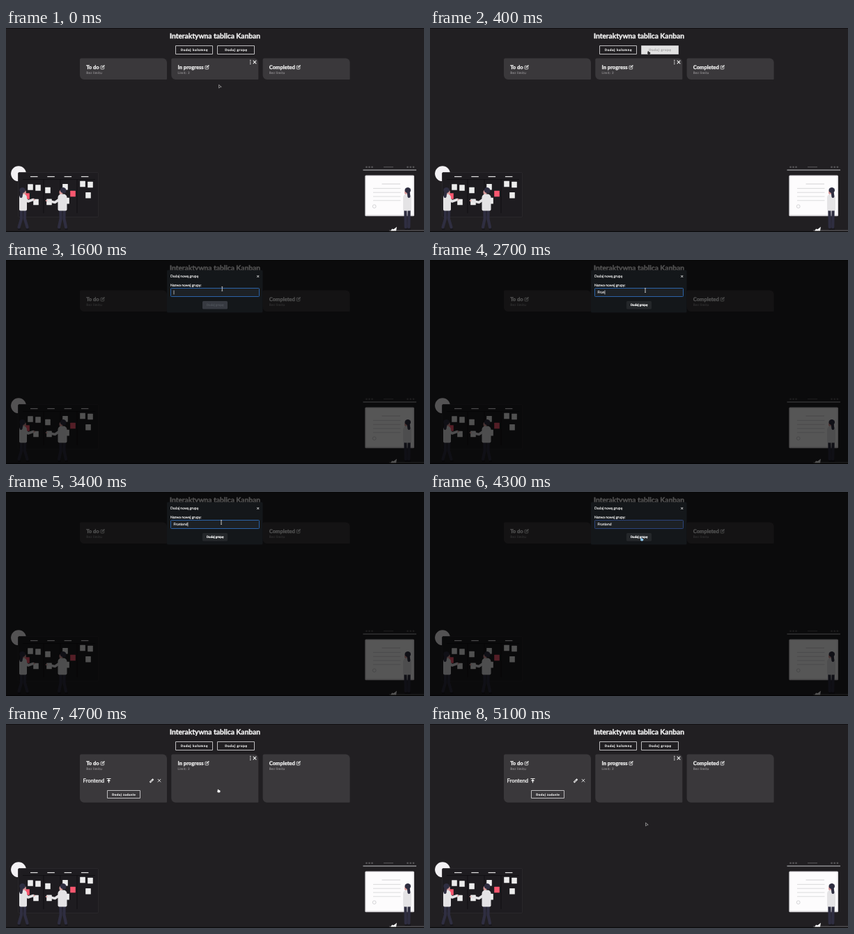
Animation of 600x293 px, one loop 5.7 s. Source, as an HTML page with a canvas:

```html
<!DOCTYPE html>
<html lang="pl">
<head>
<meta charset="utf-8">
<title>Interaktywna tablica Kanban</title>
<style>
html, body { margin: 0; width: 100%; height: 100%; overflow: hidden; background: #211f22; }
canvas { display: block; width: 600px; height: 293px; }
</style>
</head>
<body>
<canvas id="stage" width="600" height="293"></canvas>
<script>
const W = 600, H = 293, LOOP = 5700, STEP = 100;
const OPEN = 500, FOCUS = 1600, CLOSE = 4400;
const INK = '#2f2e41', SHIRT = '#e4e3e5', PINK = '#f8576f', SKIN = '#d99a9a';

const stage = document.getElementById('stage').getContext('2d');
const layer = document.createElement('canvas');
layer.width = W;
layer.height = H;
const page = layer.getContext('2d');
let c = page;

// Each move eases the pointer to a new place.
const moves = [
  { from: 0, to: 350, x: 314, y: 35.5 },
  { from: 1200, to: 1800, x: 309, y: 43.5 },
  { from: 3600, to: 4200, x: 304, y: 68 },
  { from: 4300, to: 4400, x: 301.5, y: 65 },
  { from: 4400, to: 5100, x: 311, y: 144 }
];
const WORD = 'Frontend';
const keyTimes = [2000, 2400, 2500, 2700, 3100, 3200, 3300, 3400];

function ease(t, from, to) {
  const k = Math.min(1, Math.max(0, (t - from) / (to - from)));
  return k * k * (3 - 2 * k);
}

function pointerAt(t) {
  let x = 307, y = 83.8;
  for (const m of moves) {
    const k = ease(t, m.from, m.to);
    x += (m.x - x) * k;
    y += (m.y - y) * k;
  }
  return [x, y];
}

function typedAt(t) {
  return WORD.slice(0, keyTimes.filter(at => at <= t).length);
}

function box(x, y, w, h, fill, r = 0) {
  c.fillStyle = fill;
  c.beginPath();
  c.roundRect(x, y, w, h, r);
  c.fill();
}

function frame(x, y, w, h, color, r = 0, width = 1) {
  c.strokeStyle = color;
  c.lineWidth = width;
  c.beginPath();
  c.roundRect(x, y, w, h, r);
  c.stroke();
}

function trace(p) {
  c.beginPath();
  for (let i = 0; i < p.length; i += 2) c.lineTo(p[i], p[i + 1]);
}

function line(color, width, ...p) {
  c.strokeStyle = color;
  c.lineWidth = width;
  trace(p);
  c.stroke();
}

function limb(color, width, ...p) {
  c.lineCap = c.lineJoin = 'round';
  line(color, width, ...p);
  c.lineCap = 'butt';
  c.lineJoin = 'miter';
}

function shape(fill, ...p) {
  c.fillStyle = fill;
  trace(p);
  c.fill();
}

function oval(x, y, rx, ry, fill) {
  c.fillStyle = fill;
  c.beginPath();
  c.ellipse(x, y, rx, ry, 0, 0, Math.PI * 2);
  c.fill();
}

// A hairline stroke thickens the small type slightly.
function text(s, x, y, size, { color = '#f0f0f0', weight = 400, gap = 0, align = 'left', heavy = 0.2 } = {}) {
  c.font = `${weight} ${size}px Lato, sans-serif`;
  c.letterSpacing = gap + 'px';
  c.textRendering = 'geometricPrecision';
  c.textAlign = align;
  c.fillStyle = c.strokeStyle = color;
  c.lineWidth = heavy;
  c.fillText(s, x, y);
  if (heavy) c.strokeText(s, x, y);
}

function cross(x, y, r, width = 1) {
  line('#eee', width, x - r, y - r, x + r, y + r);
  line('#eee', width, x + r, y - r, x - r, y + r);
}

function button(label, x, y, w, h, size, gap, hover = 0) {
  if (hover) box(x, y, w, h, `rgba(226,226,226,${hover})`);
  frame(x, y, w, h, '#bcbbbd');
  const color = hover > 0.9 ? '#a9a9a9' : '#eeeeee';
  text(label, x + w / 2 + gap / 2, y + h / 2 + size * 0.36, size, { color, gap, weight: 700, align: 'center' });
}

function editIcon(x, y) {
  frame(x + 0.5, y + 1.5, 4.7, 4.7, '#d8d8d8', 0.5, 0.9);
  line('#39383a', 2.4, x + 3, y + 3.6, x + 6.4, y + 0.2);
  line('#e8e8e8', 1.4, x + 2.3, y + 4.3, x + 6, y + 0.6);
}

function column(x, title, sub, h) {
  box(x, 43.5, 125, h, '#3a383b', [2, 6, 1, 6]);
  text(title, x + 9.2, 59, 7.6, { weight: 700, heavy: 0.3 });
  const end = x + 9.2 + c.measureText(title).width;
  editIcon(end + 1.8, 52.8);
  text(sub, x + 9.2, 65.5, 4.6, { color: '#858386', gap: 0.3 });
}

function group() {
  text(WORD, 110.5, 83.6, 7.7, { heavy: 0.3 });
  line('#eee', 1, 144.5, 78.5, 150.5, 78.5);
  line('#eee', 1.2, 147.5, 80, 147.5, 84.5);
  shape('#eee', 147.5, 79, 150, 82, 145, 82);
  line('#eee', 2.4, 206.6, 83.9, 211.4, 79.1);
  line('#3a383b', 0.8, 207.4, 83.1, 209.8, 80.7);
  cross(220, 81.2, 2.2, 0.9);
  button('Dodaj zadanie', 145.5, 95.5, 47, 11, 4.2, 0.6);
}

function note(x, y, fill = '#ececec') {
  box(x - 3.8, y - 4.3, 7.6, 8.6, fill, 0.5);
}

function boardArt() {
  oval(18, 209.2, 10.9, 10.9, '#f3f1f4');
  box(17.5, 207.5, 115, 64, '#1e1c20', 1.5);
  frame(17.5, 207.5, 115, 64, '#2c2a2e', 1.5, 0.8);
  line('#121114', 1, 24, 217.5, 128, 217.5);
  for (let i = 0; i < 4; i++) {
    const x = 35 + 25 * i, top = 228.5 + 4.5 * Math.sin(1.6 * i);
    line('#e4e4e4', 1.2, 35 + 24.3 * i, 213.5, 45.5 + 24.3 * i, 213.5);
    if (i) line('#100f12', 1, 30 + 24 * i, 217, 30 + 24 * i, 266);
    note(x, top);
    note(x + 4 + 4 * Math.cos(2.1 * i), 250 - 0.12 * i ** 4);
    if (i % 3 === 0) note(x + 11, top + 1);
  }
  note(96, 238, PINK);
  note(30, 241.5, PINK);
}

// Legs, shirt, head and hair around a centre x; reach is the hand of a raised arm.
function person(x, { width = 11, stride = 5, hair = 5, face = 0, reach }) {
  for (const side of [-1, 1]) {
    const foot = x + side * stride;
    limb(INK, 4.2, x + side * 2.6, 262, x + side * 2.4, 274, foot, 286);
    limb('#19181e', 2, foot - 0.5, 289, foot + 2, 289);
  }
  oval(x + face, 236, 2.5, 3.2, SKIN);
  box(x - width / 2, 238.5, width, 24, SHIRT, [5, 5, 2, 2]);
  if (reach) {
    const [hx, hy] = reach, elbow = (x + hx) / 2;
    limb(SHIRT, 3.6, x, 243, elbow, hy + 2.5, hx, hy);
    oval(hx + Math.sign(hx - x) * 1.5, hy, 1.3, 1.1, SKIN);
  }
  oval(x - face / 2, 233, 4.3, 4, INK);
  limb(INK, 4, x - face, 234, x - face * 1.6, 232 + hair);
}

function browserArt() {
  for (let i = 0; i < 3; i++) {
    oval(517.5 + 4 * i, 199.7, 1.4, 1.2, '#555457');
    oval(576.5 + 4.2 * i, 199.7, 1.4, 1.2, '#555457');
  }
  line('#555457', 1.1, 542, 199.7, 556, 199.7);
  line('#c6c5c7', 1.1, 512.5, 204, 589, 204);
  box(515.3, 211.5, 70.7, 58.7, '#d9d7da', 1.5);
  box(516.6, 212.7, 68, 55.7, '#fdfcfd', 0.5);
  line('#d2d2d4', 1, 539.5, 224, 566, 224);
  for (let i = 0; i < 4; i++) line('#d7d7d9', 0.9, 527, 230.4 + 5.8 * i, 566.5, 230.4 + 5.8 * i);
  frame(526.3, 253.8, 4.8, 4.8, '#d0d0d2', 2.4, 0.9);
  line('#807e81', 0.9, 550, 291, 600, 291);
  shape('#f2f2f2', 552, 291.5, 554, 288.5, 556.5, 289, 561, 285.5, 560, 291.5);
}

function drawPage(t) {
  const done = t >= CLOSE;
  const h = done ? 69.3 : 30.5;
  box(0, 0, W, H, '#211f22');
  text('Interaktywna tablica Kanban', 300, 14.7, 10.2, { weight: 700, align: 'center', heavy: 0.4 });
  button('Dodaj kolumnę', 243.5, 25.5, 53, 12, 4.5, 0.7);
  button('Dodaj grupę', 303.5, 25.5, 53, 12, 4.5, 0.7, done ? 0 : ease(t, 200, 400));
  column(106, 'To do', 'Bez limitu', h);
  column(237.3, 'In progress', 'Limit: 2', h);
  column(368.6, 'Completed', 'Bez limitu', h);
  for (let i = 0; i < 3; i++) oval(350.8, 46.5 + 2.5 * i, 0.8, 0.8, '#eee');
  cross(357, 49, 2.3, 1.1);
  if (done) group();
  boardArt();
  person(24.5, { face: 1.8, hair: 10, stride: 6, reach: [39, 246.5] });
  person(81, { face: -2, hair: 3, width: 13, reach: [59.5, 248] });
  browserArt();
  person(576, { face: -1.5, hair: 10, stride: 2.2, width: 12 });
  box(0, 0, W, 1, '#121113');
  box(0, 291.7, W, 1.3, '#0b0b0c');
}

function drawModal(t) {
  const typed = typedAt(t), focus = t >= FOCUS;
  const border = !focus ? '#282d32' : t < 4200 ? '#2b62a6' : '#2b4379';
  box(231, 14.5, 137.5, 61, '#14171a', 1.5);
  text('Dodaj nową grupę', 236, 25.4, 5, { color: '#e6e6e6' });
  cross(361.7, 23.5, 1.5, 0.9);
  text('Nazwa nowej grupy:', 236, 37.6, 5);
  box(236, 40, 128, 13, '#1d2125', 1);
  frame(236.5, 40.5, 127, 12, border, 1);
  text(typed, 240.6, 48.4, 5, { color: '#e2e2e2' });
  if (focus && t < 3700) {
    const x = 241 + c.measureText(typed).width;
    line('#e8e8e8', 0.7, x, 43.5, x, 49.5);
  }
  box(282, 59, 36, 11.5, typed ? '#24272a' : '#373a41', 1.5);
  text('Dodaj grupę', 300, 66.4, 4.5, { color: typed ? '#ffffff' : '#4c5057', weight: 700, align: 'center' });
}

function arrow(x, y) {
  const p = [x - 1.4, y - 2.2, x + 2.2, y + 0.8, x + 0.2, y + 1.1, x - 1.3, y + 2.5, x - 1.4, y - 2.2];
  shape('#161617', ...p);
  line('#bdbcbe', 0.7, ...p);
}

function hand(x, y, color) {
  limb(color, 1.3, x - 0.8, y - 1.8, x - 0.4, y + 0.5);
  oval(x + 0.2, y + 0.6, 2.2, 1.9, color);
}

function beam(x, y) {
  line('#d5d5d5', 0.9, x, y - 3, x, y + 3);
  for (const end of [-3, 3]) line('#d5d5d5', 0.6, x - 1, y + end, x + 1, y + end);
}

function drawCursor(t, modal) {
  const [x, y] = pointerAt(t);
  if (modal && y > 40 && y < 53) beam(x, y);
  else if (modal && y > 59) hand(x, y, t >= 4300 ? '#8cc6ea' : '#eeeeee');
  else if (t >= CLOSE && y < 113) hand(x, y, '#f4f4f4');
  else if (!modal && y < 38) hand(x, y, '#29282a');
  else arrow(x, y);
}

function draw(now) {
  const t = Math.floor((now % LOOP) / STEP) * STEP;
  const modal = t >= OPEN && t < CLOSE;
  c = page;
  drawPage(t);
  c = stage;
  c.filter = modal ? 'blur(0.6px)' : 'none';
  c.drawImage(layer, 0, 0);
  c.filter = 'none';
  if (modal) {
    box(0, 0, W, H, 'rgba(0,0,0,0.66)');
    drawModal(t);
  }
  drawCursor(t, modal);
}

let start;
function tick(now) {
  start ??= now;
  draw(now - start);
  requestAnimationFrame(tick);
}
requestAnimationFrame(tick);
</script>
</body>
</html>
```
